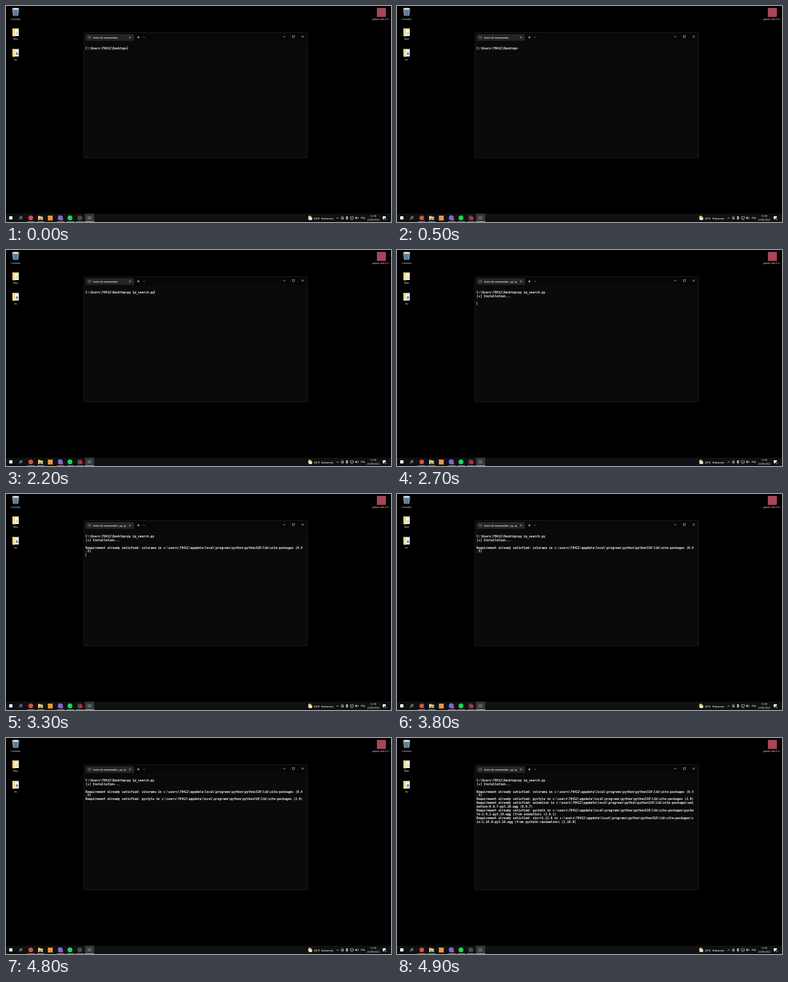
An HTML page with a canvas that plays this animation: 600 by 338 pixels, repeating every 5 s.

```html
<!DOCTYPE html>
<html lang="fr">
<head>
<meta charset="utf-8">
<title>Terminal</title>
<style>
html, body { margin: 0; width: 100%; height: 100%; overflow: hidden; background: #000; }
canvas { display: block; width: 100%; height: 100%; }
</style>
</head>
<body>
<canvas id="stage"></canvas>
<script>
const W = 600, H = 338, LOOP = 5000;
const canvas = document.getElementById('stage');
const ctx = canvas.getContext('2d');
const ratio = window.devicePixelRatio || 1;
canvas.width = Math.round(W * ratio);
canvas.height = Math.round(H * ratio);

const SANS = '"Open Sans", "Noto Sans", sans-serif';
const MONO = '"DejaVu Sans Mono", "Liberation Mono", monospace';
const COLS = 120, CELL = 2.817, ROW = 5.97, LEFT = 124.1, TOP = 62.8;

const prompt = 'C:\\Users\\70412\\Desktop>';
const packages = 'c:\\users\\70412\\appdata\\local\\programs\\python\\python310\\lib\\site-packages';
const satisfied = (name, rest) => `Requirement already satisfied: ${name} in ${packages}${rest}`;

const typed = [[0, ''], [900, 'p'], [1200, 'py'], [1300, 'py .'], [1400, 'py .py'],
  [1700, 'py my_tools.py'], [2200, 'py ip_search.py']];
const output = [
  [2700, ['[+] Installation...', '']],
  [3300, [satisfied('colorama', ' (0.4.5)')]],
  [4100, [satisfied('pystyle', ' (2.0)')]],
  [4900, [
    satisfied('animation', '\\animation-0.0.7-py3.10.egg (0.0.7)'),
    satisfied('pychalk', '\\pychalk-2.0.1-py3.10.egg (from animation) (2.0.1)'),
    satisfied('six>=1.11.0', '\\six-1.16.0-py3.10.egg (from pychalk->animation) (1.16.0)')
  ]]
];
const cursorOff = [[500, 900], [3800, 4100], [4800, 5000]];
const recording = [200, 4800];
const within = (t, [from, to]) => t >= from && t < to;

function rect(x, y, w, h, color) {
  ctx.fillStyle = color;
  ctx.fillRect(x, y, w, h);
}

function disc(x, y, r, color) {
  ctx.fillStyle = color;
  ctx.beginPath();
  ctx.arc(x, y, r, 0, Math.PI * 2);
  ctx.fill();
}

function shape(points, color) {
  ctx.fillStyle = color;
  ctx.beginPath();
  points.forEach(([x, y]) => ctx.lineTo(x, y));
  ctx.fill();
}

function line(points, color = '#ddd', width = 0.6) {
  ctx.strokeStyle = color;
  ctx.lineWidth = width;
  ctx.beginPath();
  points.forEach(([x, y], i) => i ? ctx.lineTo(x, y) : ctx.moveTo(x, y));
  ctx.stroke();
}

function frame(x, y, w, h, color = '#ddd', width = 0.6) {
  ctx.strokeStyle = color;
  ctx.lineWidth = width;
  ctx.strokeRect(x, y, w, h);
}

function cross(x, y, r) {
  line([[x - r, y - r], [x + r, y + r]]);
  line([[x + r, y - r], [x - r, y + r]]);
}

// Small type is set large and scaled down to keep fractional advances.
function text(str, x, y, size, { color = '#fff', align = 'left', weight = 500, family = SANS } = {}) {
  ctx.save();
  ctx.translate(x, y);
  ctx.scale(0.1, 0.1);
  ctx.font = `${weight} ${size * 10}px ${family}`;
  ctx.textAlign = align;
  ctx.fillStyle = color;
  ctx.fillText(str, 0, 0);
  ctx.restore();
}

function label(str, x, y) {
  text(str, x, y, 3.6, { align: 'center' });
}

function folder(x, y, accent) {
  rect(x, y, 10, 12, '#e3bd62');
  rect(x + 3.5, y + 1.5, 6, 10.5, '#f6f6f2');
  rect(x + 5.5, y + 5.5, 3, 4, accent);
  shape([[x, y], [x + 3.5, y + 1.5], [x + 3.5, y + 13], [x, y + 12]], '#f8dc8c');
}

function bin() {
  shape([[9.5, 5], [20.5, 5], [19, 15.5], [11, 15.5]], '#6f7a83');
  shape([[9, 4.5], [12, 3], [18, 3], [21, 4.5], [18, 6], [12, 6]], '#d3d9dc');
  line([[10.5, 6.5], [11.7, 15]], '#b8c2c8');
  line([[19.5, 6.5], [18.3, 15]], '#b8c2c8');
  disc(15, 10.8, 2.4, '#2f88cf');
}

function desktop() {
  rect(0, 0, W, H, '#000');
  bin();
  label('Corbeille', 15, 21.6);
  folder(10, 35, '#d8d2bd');
  label('Web', 15, 53.4);
  folder(10, 67, '#4c8fc4');
  label('py', 15, 85.2);
  rect(578, 3, 14, 14, '#a8455a');
  text('pakzen-x64-611...', 585, 21.6, 3.5, { align: 'center' });
}

function terminalWindow(running) {
  rect(121, 41, 349, 197, '#0a0a0a');
  rect(121, 41, 349, 13.5, '#070707');
  ctx.fillStyle = '#252525';
  ctx.beginPath();
  ctx.roundRect(124, 44, 75.5, 10.5, [2, 2, 0, 0]);
  ctx.fill();
  frame(121.5, 41.5, 348, 196, '#1f1f1f', 0.8);

  rect(127.5, 47, 5, 4.3, '#4c4c4c');
  ctx.save();
  ctx.beginPath();
  ctx.rect(135, 44, 52.5, 11);
  ctx.clip();
  text('Invite de commandes' + (running ? ' - py  ip_search.py' : ''), 135.8, 50.6, 3.7, { weight: 600 });
  ctx.restore();

  cross(193.2, 49.2, 1.3);
  line([[204.3, 49], [208.3, 49]], '#ddd', 0.7);
  line([[206.3, 47], [206.3, 51]], '#ddd', 0.7);
  line([[213.8, 48.5], [215.2, 49.7], [216.6, 48.5]], '#aaa');
  line([[432, 48], [435.5, 48]]);
  frame(446.5, 46.3, 3.2, 3.2, '#bbb');
  cross(462.3, 47.9, 1.6);
}

function wrap(str) {
  const rows = [];
  do {
    rows.push(str.slice(0, COLS));
    str = str.slice(COLS);
  } while (str);
  return rows;
}

function terminalText(t) {
  const command = typed.filter(([at]) => t >= at).pop()[1];
  const shown = output.filter(([at]) => t >= at).flatMap(([, lines]) => lines);
  const rows = [prompt + command, ...shown].flatMap(wrap);
  rows.forEach((row, i) =>
    text(row, LEFT, TOP + 4.8 + i * ROW, 4.68, { color: '#f2f2f2', weight: 700, family: MONO }));

  if (cursorOff.some(span => within(t, span))) return;
  const col = shown.length ? 0 : rows[0].length;
  const row = shown.length ? rows.length : 0;
  rect(LEFT + col * CELL, TOP + row * ROW, 0.6, 5.8, '#e8e8e8');
}

function taskbar(isRecording) {
  rect(0, 325, W, 13, '#101113');
  rect(123, 325, 14.5, 13, '#35373a');
  [33, 48, 79.5, 94.5, 109.5].forEach(x => rect(x, 337, 11.5, 1, '#858a8e'));
  rect(123, 337, 14.5, 1, '#a9b0b5');

  rect(5, 329, 5, 5, '#fff');
  ctx.strokeStyle = '#eee';
  ctx.lineWidth = 0.7;
  ctx.beginPath();
  ctx.arc(23.4, 331, 1.7, 0, Math.PI * 2);
  ctx.stroke();
  line([[22.2, 332.2], [20.4, 334.2]], '#eee', 0.7);

  disc(38.6, 331.6, 3.6, '#d9503f');
  shape([[50, 328.6], [53, 328.6], [54, 329.5], [57.5, 329.5], [57.5, 335], [50, 335]], '#f5cf62');
  rect(51.5, 332.5, 4.5, 2.5, '#4292d0');
  rect(65.2, 328, 7.6, 7.6, '#f0953f');
  disc(84.6, 331.4, 3.9, '#6570e8');
  disc(87, 333.8, 2, '#e5484d');
  disc(99.7, 331.6, 3.8, '#1ed45f');
  disc(115, 331.6, 3.8, '#45484b');
  if (isRecording) disc(116.6, 332.4, 2.7, '#e01f26');
  rect(126.8, 328.8, 6.4, 5.4, '#5d6063');
}

function tray() {
  disc(473.3, 330.6, 2.5, '#f3b73b');
  disc(473, 333, 1.9, '#dfe5ea');
  disc(475.2, 332.4, 2.2, '#dfe5ea');
  rect(473, 333, 3.6, 1.9, '#dfe5ea');
  text('22°C', 480, 333.5, 4.2, { weight: 600 });
  text('Eclaircies', 491.8, 333.5, 4.1, { weight: 600 });
  line([[515, 332.8], [516.8, 331], [518.6, 332.8]], '#eee', 0.7);

  frame(522.8, 329.8, 2.4, 3.6);
  disc(525.2, 332.2, 1, '#ddd');
  rect(530.4, 329, 2, 3.7, '#eee');
  line([[529.6, 331.8], [530.3, 333.4], [532.5, 333.4], [533.2, 331.8]]);
  line([[531.4, 333.4], [531.4, 334.8]]);
  frame(536.8, 329.8, 4.5, 3);
  line([[537.4, 334.3], [540.6, 334.3]]);
  shape([[544.3, 330.8], [545.2, 330.8], [546.5, 329.5], [546.5, 333.8], [545.2, 332.5], [544.3, 332.5]], '#eee');
  [1.2, 2.5].forEach(r => {
    ctx.strokeStyle = '#ddd';
    ctx.lineWidth = 0.5;
    ctx.beginPath();
    ctx.arc(546.6, 331.6, r, -0.8, 0.8);
    ctx.stroke();
  });

  text('FRA', 552.7, 333, 3.7);
  text('12:58', 572.4, 330, 3.65, { align: 'center' });
  text('22/08/2022', 572.4, 335.9, 3.65, { align: 'center' });
  rect(587, 329, 5, 4.2, '#eee');
  shape([[588, 333], [590, 333], [588, 334.6]], '#eee');
  disc(591.7, 333.3, 2.1, '#24272a');
  text('2', 591.7, 334.5, 3, { align: 'center' });
}

function draw(now) {
  const t = now % LOOP;
  ctx.setTransform(canvas.width / W, 0, 0, canvas.height / H, 0, 0);
  desktop();
  terminalWindow(t >= 2700);
  terminalText(t);
  taskbar(within(t, recording));
  tray();
}

const start = performance.now();
function tick() {
  draw(performance.now() - start);
  requestAnimationFrame(tick);
}
tick();
</script>
</body>
</html>
```
